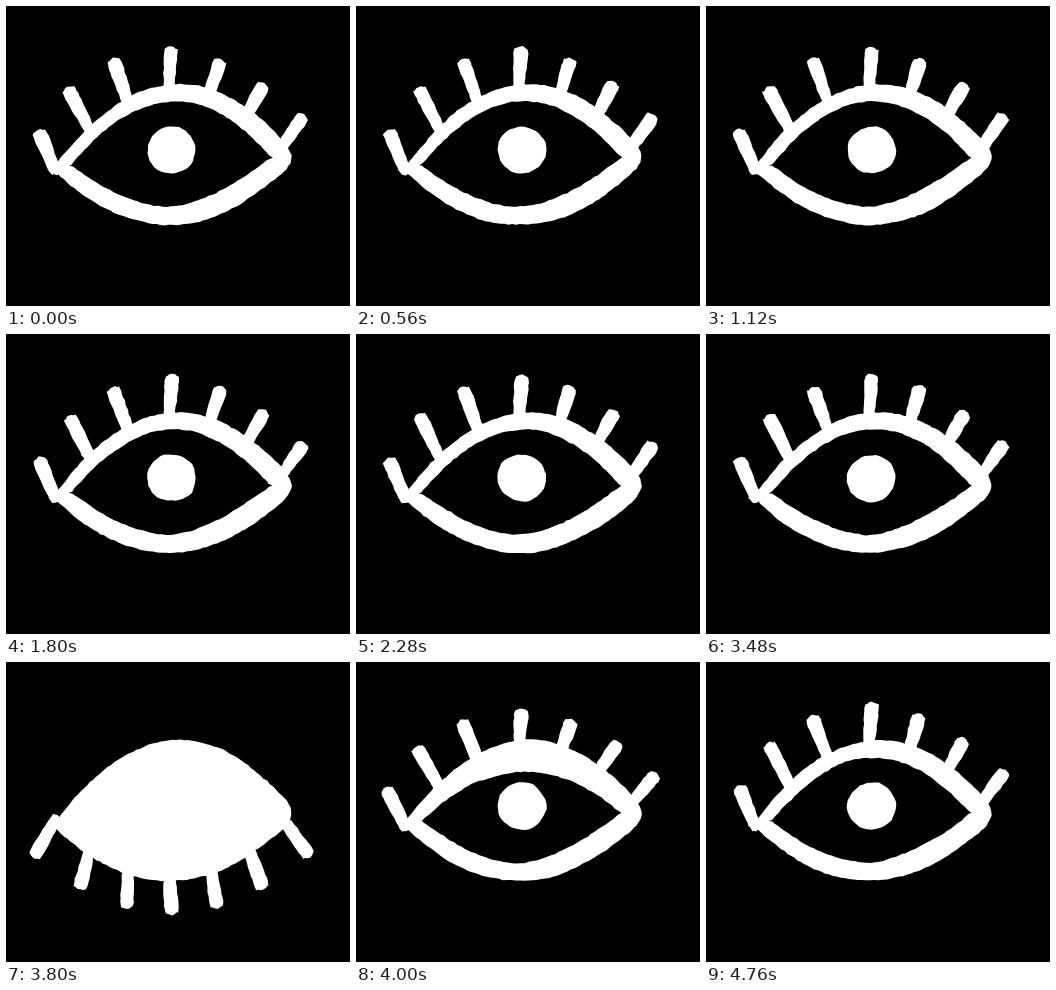
An HTML page with a canvas for the animation above (4.8 s loop, 344x300 px).

```html
<!DOCTYPE html>
<html lang="en">
<head>
<meta charset="utf-8">
<title>Blinking eye</title>
<style>
  html, body { margin: 0; width: 100%; height: 100%; overflow: hidden; background: #000; }
  canvas { display: block; }
</style>
</head>
<body>
<canvas id="eye" width="344" height="300"></canvas>
<script>
const ctx = document.getElementById('eye').getContext('2d');
const { PI, sin, cos, abs, pow } = Math;
const LOOP = 4800, STEP = 40, LASHES = 7;

const mix = (a, b, k) => a + (b - a) * k;
const mixPoint = (a, b, k) => [mix(a[0], b[0], k), mix(a[1], b[1], k)];
const bow = (center, peak, bend, power = 2) => x => peak + bend * pow(abs(x - center), power);

// Lid edges as height over x
const outerTop = bow(173, 78, .0053);
const outerBottom = bow(163, 219, -.0041);
const innerTop = bow(168, 95.5, .006);
const innerBottom = bow(160, 201, -.0183, 1.7);

let seed = 1;
function jitter(size) {
  seed = (Math.imul(seed, 1664525) + 1013904223) >>> 0;
  return (seed / 4294967296 * 2 - 1) * size;
}

function smooth(from, to, time) {
  const p = Math.min(1, Math.max(0, (time - from) / (to - from)));
  return p * p * (3 - 2 * p);
}
const blinkAt = time => smooth(3610, 3710, time) - smooth(3910, 4010, time);

function spline(a, b, c, d, t) {
  return .5 * (2 * b + (c - a) * t + (2 * a - 5 * b + 4 * c - d) * t * t + (3 * b - a - 3 * c + d) * t * t * t);
}

// Fill a closed spline with a slightly ragged, hand-drawn edge
function blob(points, color, shake = .6, grain = .5) {
  const pts = points.map(([x, y]) => [x + jitter(shake), y + jitter(shake)]);
  const n = pts.length;
  ctx.beginPath();
  for (let i = 0; i < n; i++) {
    const p = [-1, 0, 1, 2].map(k => pts[(i + k + n) % n]);
    const parts = Math.max(2, Math.round(Math.hypot(p[2][0] - p[1][0], p[2][1] - p[1][1]) / 4));
    for (let s = 0; s < parts; s++) {
      const at = axis => spline(...p.map(q => q[axis]), s / parts) + jitter(grain);
      ctx.lineTo(at(0), at(1));
    }
  }
  ctx.closePath();
  ctx.fillStyle = color;
  ctx.fill();
}

// Points between two edges: along the upper one, back along the lower one
function almond(x0, x1, top, bottom) {
  const xs = Array.from({ length: 9 }, (_, i) => mix(x0, x1, i / 8));
  return [...xs.map(x => [x, top(x)]), ...xs.reverse().map(x => [x, bottom(x)])];
}

function arc(cx, cy, rx, ry, from, sweep, count) {
  return Array.from({ length: count }, (_, i) => {
    const a = from + sweep * i / (count - 1);
    return [cx + cos(a) * rx, cy + sin(a) * ry];
  });
}

// u runs from -1 at the left lash to 1 at the right one
function drawLash(u, closed) {
  const baseX = 163 + 114 * u + 3.5 * sin(PI * u);
  const baseY = mix(outerTop(baseX) + 4, outerBottom(baseX) - 8, closed);
  const up = [162 + 130 * u + 10 * sin(PI * u) + 3 * cos(2 * PI * u), 47 + 75 * pow(abs(u), 1.7) - 8 * u ** 3];
  const side = [164 + 165 * sin(PI * u / 2), 140];
  const down = [165 + 135 * u, 246 - 56 * u * u];
  const [x, y] = mixPoint(mixPoint(up, side, closed), mixPoint(side, down, closed), closed);
  const tipX = x + jitter(.8), tipY = y + jitter(.8);
  const angle = Math.atan2(tipY - baseY, tipX - baseX);
  blob([
    ...arc(tipX, tipY, 7, 7, angle - PI / 2, PI, 5),
    ...arc(baseX, baseY, 5.5, 5.5, angle + PI / 2, PI, 5)
  ], '#fff', .5, .5);
}

function draw(time) {
  const step = Math.floor(time / STEP);
  const closed = blinkAt(step * STEP);
  const lid = pow(closed, .55);
  seed = (step + 1) * 7919;

  ctx.fillStyle = '#000';
  ctx.fillRect(0, 0, 344, 300);
  for (let i = 0; i < LASHES; i++) drawLash(i * 2 / (LASHES - 1) - 1, closed);
  blob(almond(45, 282, outerTop, outerBottom), '#fff');
  if (lid > .97) return;

  ctx.save();
  blob(almond(66, 263, x => mix(innerTop(x), innerBottom(x), lid), innerBottom), '#000');
  ctx.clip();
  blob(arc(165.5, 144, 24.5, 23.5, 0, 1.8 * PI, 10), '#fff', .8, .4);
  ctx.restore();
}

const start = performance.now();
function tick() {
  draw((performance.now() - start) % LOOP);
  requestAnimationFrame(tick);
}
tick();
</script>
</body>
</html>
```
